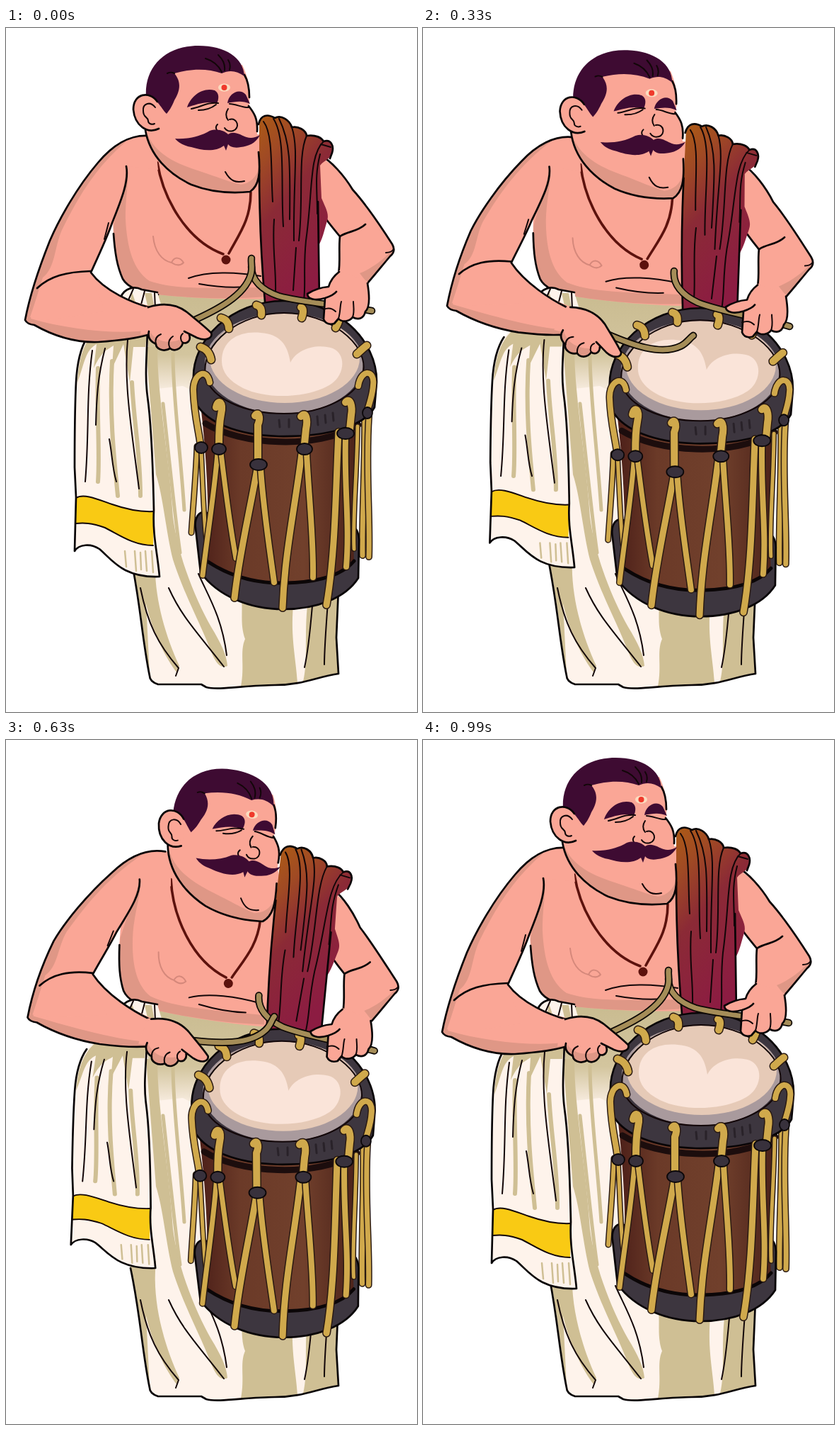
Recreate the animation shown at these times as an HTML page. Size 581 by 965 pixels, loop 1.02 s.

```html
<!DOCTYPE html>
<html lang="en">
<head>
<meta charset="utf-8">
<title>Drummer</title>
<style>
html, body { margin: 0; width: 100%; height: 100%; overflow: hidden; background: #fff; }
svg { display: block; width: 100%; height: 100%; }
path { fill: none; stroke-linecap: round; stroke-linejoin: round; }
.skin { fill: #faa696; }
.tan { fill: #df9786; }
.cream { fill: #fef3eb; }
.sand { fill: #cfbf94; }
.dark { fill: #3d363f; }
.hair { fill: #3e0b32; }
.gold { fill: #f9ca14; }
.ink { stroke: #080406; stroke-width: 2.7; }
.thin { stroke: #120608; stroke-width: 2; }
.bead { stroke: #5c120d; stroke-width: 3.6; }
</style>
</head>
<body>
<svg id="stage" viewBox="0 0 581 965" preserveAspectRatio="none"></svg>
<script>
const path = (cls, d, extra = '') => `<path class="${cls}" d="${d}" ${extra}/>`;
const stroke = (d, color, w) => `<path d="${d}" stroke="${color}" stroke-width="${w}"/>`;
const folds = (w, ...list) => list.map(d => stroke(d, '#cfbf94', w)).join('');
const cord = (d, w = 8) => stroke(d, '#2a1a12', w + 3) + stroke(d, '#d0a94c', w);
const stick = d => stroke(d, '#0d0805', 10.5) + stroke(d, '#a58d58', 7);
const knot = (x, y, r = 10) => `<ellipse cx="${x}" cy="${y}" rx="${r}" ry="8" fill="#38313c" stroke="#0b0709" stroke-width="1.8"/>`;
const oval = (x, y, rx, ry, c) => `<ellipse cx="${x}" cy="${y}" rx="${rx}" ry="${ry}" fill="${c}"/>`;

const defs = `<defs>
  <linearGradient id="silk" x1="0" y1="0" x2=".45" y2="1">
    <stop offset="0" stop-color="#ac5a16"/><stop offset=".22" stop-color="#a04a24"/>
    <stop offset=".5" stop-color="#8b2a36"/><stop offset="1" stop-color="#8c1c42"/>
  </linearGradient>
  <linearGradient id="wood">
    <stop offset="0" stop-color="#4d2019"/><stop offset=".25" stop-color="#6b3a28"/>
    <stop offset=".65" stop-color="#71402c"/><stop offset="1" stop-color="#4a2119"/>
  </linearGradient>
  <linearGradient id="waist" x1="0" y1="0" x2="0" y2="1">
    <stop offset="0" stop-color="#c9bb90"/><stop offset=".6" stop-color="#d3c59e"/>
    <stop offset="1" stop-color="#fef3eb"/>
  </linearGradient>
</defs>`;

const skirt =
  path('cream', 'M168 374 C180 364 200 368 215 372 L366 378 L440 560 L471 790 L467 860 L470 911 C440 915 420 927 380 927 C340 927 300 935 283 930 L276 926 L215 926 Q203 922 203 914 C192 860 192 810 176 745 L120 445 Z') +
  path('', 'M196 372 L366 378 L372 440 L280 520 L250 505 L205 510 Z', 'style="fill:url(#waist)"') +
  path('sand', 'M198 450 L214 450 C214 520 230 600 236 690 C244 750 270 810 290 845 C304 868 312 885 313 900 C302 905 296 894 290 880 C276 842 252 800 236 750 C226 710 222 660 212 630 Z') +
  path('sand', 'M172 720 L212 735 C206 790 222 850 245 900 L242 910 C226 890 206 850 198 812 L203 912 C194 860 190 800 176 745 Z') +
  path('sand', 'M332 800 L406 815 C402 860 410 890 412 924 C390 928 350 930 332 929 C338 900 330 880 338 862 C330 840 336 820 332 800 Z') +
  path('sand', 'M428 800 L470 800 L467 860 L470 911 L420 922 C428 890 420 850 428 800 Z') +
  folds(5, 'M236 460 C236 520 246 590 252 680', 'M222 530 C234 640 240 700 246 740') +
  path('ink', 'M176 745 C190 810 192 860 203 914 Q203 922 215 926 L276 926 L283 930 C300 935 340 927 380 927 C420 927 440 915 470 911 L467 860 L470 790') +
  path('thin', 'M190 790 C200 840 215 870 244 903 L240 914 M230 790 C248 830 268 850 308 901 M272 770 C285 800 305 830 312 885 M433 815 C430 850 427 880 422 902 M455 810 C452 850 450 880 450 898');

const drape =
  path('cream', 'M135 418 C112 432 102 460 99 500 C97 540 97 580 97 620 L99 662 L97 738 C103 728 120 727 132 735 C150 750 165 776 217 774 C214 740 207 715 209 680 C208 640 207 570 200 520 C196 490 199 465 200 425 Z') +
  path('sand', 'M135 420 C112 436 103 462 101 500 C112 470 112 455 128 446 L124 480 C136 455 142 455 152 448 L150 480 L166 446 L175 500 L180 450 L197 450 L200 425 Z') +
  folds(6, 'M130 480 C128 540 133 600 130 640', 'M150 470 C146 540 152 600 158 660', 'M178 500 C181 560 190 600 190 660') +
  folds(2.5, 'M168 738 L170 760', 'M182 738 L184 766', 'M197 738 L199 766', 'M190 740 L191 764', 'M206 738 L208 768') +
  path('gold', 'M99 663 C110 656 130 665 150 672 C170 679 190 683 209 682 L208 730 C180 730 160 715 140 705 C120 698 110 698 99 699 Z') +
  path('ink', 'M115 436 C103 455 100 480 99 500 C97 540 97 580 97 620 L99 662 L97 738 C103 728 120 727 132 735 C150 750 165 776 217 774 C214 740 207 715 209 680 C208 640 207 570 200 520 C196 490 199 465 200 425') +
  path('thin', 'M99 663 C110 656 130 665 150 672 C170 679 190 683 209 682 M99 699 C110 698 120 698 140 705 C160 715 180 730 208 730') +
  path('thin', 'M122 455 C113 520 118 570 112 640 M140 452 C130 490 128 520 127 560 M172 440 C166 500 178 570 188 650 M146 580 C150 600 150 620 156 640');

const torso =
  path('skin', 'M185 158 L360 150 L372 190 L372 382 C310 384 250 380 215 376 C195 374 176 372 166 354 C158 335 155 310 152 292 L150 250 L165 190 Z') +
  path('tan', 'M170 196 C176 205 168 240 169 270 C171 310 180 342 203 357 C240 370 300 367 366 366 L368 379 C310 384 250 380 215 376 C195 374 176 372 166 354 C156 330 152 300 152 280 Z') +
  path('ink', 'M152 290 C154 318 157 336 165 354 C172 366 190 373 215 376') +
  path('thin', 'M258 353 C285 343 325 344 360 350 M273 361 C295 365 318 367 340 365') +
  stroke('M208 294 C210 315 220 328 234 331 C238 322 246 323 251 331 C246 336 240 335 234 331', '#d5887b', 2) +
  path('bead', 'M214 190 C222 240 255 300 307 319 M346 232 C346 270 330 290 315 318') +
  `<circle cx="311" cy="327" r="6.5" fill="#5c120d"/>`;

const pleats =
  path('cream', 'M162 382 C166 366 182 364 190 369 L214 373 L222 400 L170 400 Z') +
  path('sand', 'M178 372 L186 396 L174 396 Z M196 374 L206 374 L210 396 L201 396 Z') +
  path('ink', 'M162 380 C168 366 182 364 192 369 L214 373') +
  path('thin', 'M180 368 L172 386 M196 371 L190 394 M210 373 L211 396');

const scarf =
  path('', 'M358 142 C357 126 368 120 380 127 C389 122 401 130 404 140 C413 138 424 144 425 152 C438 150 446 155 449 160 C459 156 464 166 461 176 C458 186 450 186 444 194 L446 240 C452 254 457 262 454 272 C450 285 447 300 441 308 L443 388 L366 388 C362 340 359 280 358 210 Z', 'style="fill:url(#silk)"') +
  path('ink', 'M357 136 C360 122 370 121 380 127 C389 122 401 130 404 140 C413 138 424 144 425 152 C438 150 446 155 449 160 C459 156 464 166 461 176 L458 184 M441 245 L443 386 M358 200 C358 280 362 340 366 386') +
  path('thin', 'M364 132 C378 150 374 200 377 245 M378 128 C396 155 388 220 392 280 M386 128 C402 160 402 190 401 270 M404 140 C414 170 406 210 407 300 M425 152 C412 180 421 240 414 300 M449 160 C428 180 434 230 424 300 M444 178 C436 210 440 225 440 262 M379 270 C376 310 382 340 381 372 M424 300 C420 340 424 360 421 384 M445 164 L459 168 M410 310 L406 370');

const head =
  path('skin', 'M240 50 L334 52 C345 75 346 95 343 112 C352 122 356 130 355 150 L357 175 C360 205 358 222 345 231 C315 234 285 230 262 221 C230 206 203 180 197 146 L197 95 Z') +
  path('tan', 'M197 142 C205 170 228 186 262 198 C290 207 318 218 332 221 C346 219 353 210 357 200 C359 216 355 226 345 231 C315 234 285 230 262 221 C228 206 203 180 197 142 Z') +
  path('ink', 'M197 144 C203 180 230 206 262 221 C285 230 315 234 345 231 C358 222 360 205 357 175 M343 110 C351 120 356 128 355 146 M337 66 C343 76 344 86 344 98') +
  path('hair', 'M198 98 C195 55 225 25 272 25 C310 25 336 42 337 68 C326 60 316 59 305 64 C285 57 262 57 238 64 C250 78 244 92 238 102 C234 112 231 116 227 121 C218 112 214 98 198 96 Z') +
  path('thin', 'M305 62 C300 52 292 46 282 43 M309 60 C310 50 306 44 300 38 M316 59 C318 52 316 48 314 45 M238 64 C234 62 232 62 228 64') +
  path('skin', 'M217 110 C205 88 180 90 180 115 C182 138 200 150 217 142 Z') +
  path('ink', 'M214 104 C203 88 180 92 180 115 C182 138 200 150 216 142') +
  path('thin', 'M211 112 C204 103 193 106 194 117 C194 127 200 124 201 131 C201 135 206 137 210 135') +
  path('hair', 'M256 112 C261 96 278 83 295 88 C302 92 301 100 298 107 C284 102 270 108 256 112 Z M313 106 C315 92 330 84 339 94 L345 107 C334 102 324 104 313 106 Z') +
  path('thin', 'M262 114 C275 112 285 104 300 106 M272 116 C284 116 292 112 297 108 M316 107 C326 107 334 113 344 112 M314 114 C310 120 311 126 314 130 M316 129 C328 126 331 142 321 145 C314 147 311 144 309 141 M299 136 C295 140 297 146 303 146') +
  path('hair', 'M239 156 C255 157 273 154 288 145 C300 141 310 146 314 150 C322 144 332 151 340 154 C346 156 352 155 359 151 C353 163 342 167 332 168 C322 170 316 167 314 164 L311 173 L308 166 C295 176 275 172 262 168 C252 166 245 163 239 156 Z') +
  path('thin', 'M310 203 C317 216 325 219 337 216') +
  oval(308.5, 84, 8.5, 5.5, '#fbdcc0') + `<circle cx="308.5" cy="84" r="4" fill="#f0392b"/>`;

const drum =
  cord('M270 590 C268 640 264 680 262 712', 6) +
  cord('M507 545 C508 620 503 690 504 744', 7) + cord('M513 548 C508 620 515 690 513 746', 7) +
  path('dark ink', 'M284 684 C272 680 266 692 268 706 L275 768 C300 802 345 820 392 820 C440 820 480 804 498 776 L499 722 Q498 705 488 702 Z') +
  path('', 'M276 540 C284 610 288 690 284 752 C320 776 360 784 395 783 C440 782 475 772 492 752 C490 700 494 620 500 552 Z', 'style="fill:url(#wood)"') +
  path('', 'M284 752 C320 776 360 784 395 783 C440 782 475 772 492 752', 'stroke="#0b0607" stroke-width="5"') +
  path('', 'M282 558 C330 588 440 596 498 560', 'stroke="#1c0d0d" stroke-width="9"') +
  path('dark ink', 'M265 497 C262 440 318 385 393 385 C468 385 525 440 524 500 L521 535 C505 564 450 577 385 576 C325 574 285 556 270 532 Z') +
  stroke('M441 560 L440 548 M452 557 L451 546 M463 554 L462 543 M387 563 L386 553 M400 563 L400 552', '#292229', 3) +
  oval(393, 473, 112, 71, '#a99a9d') + oval(394, 466, 106, 63, '#e6cab7') +
  path('', 'M305 470 C305 440 330 427 360 430 C386 432 398 445 402 472 C412 452 440 445 462 452 C482 461 478 490 460 502 C430 522 370 525 335 508 C315 498 305 485 305 470 Z', 'style="fill:#fae4d9"') +
  path('thin', 'M282 490 C275 445 330 402 393 402 C456 402 512 445 505 485 C500 518 450 544 393 544 C336 544 288 522 282 490') +
  [[275, 450, 290, 468], [304, 409, 315, 424], [354, 391, 361, 405], [417, 394, 418, 409], [470, 409, 466, 423], [510, 448, 496, 460]]
    .map(([a, b, c, d]) => cord(`M${a} ${b} Q${(a + c) / 2 + 5} ${(b + d) / 2 - 5} ${c} ${d}`, 10)).join('') +
  cord('M288 500 C284 478 264 488 265 512 C266 545 272 565 275 588', 8) +
  cord('M498 505 C502 480 522 482 519 504 C518 520 513 530 511 540', 8) +
  cord('M276 598 C278 640 280 700 283 720', 5) +
  cord('M299 600 C294 660 284 720 278 772', 7) + cord('M304 600 C310 650 318 710 325 748', 7) +
  cord('M355 622 C345 680 330 740 323 804', 9) + cord('M360 622 C364 680 372 730 379 782', 8) +
  cord('M418 600 C408 680 394 740 391 818', 9) + cord('M425 600 C428 660 435 720 434 775', 8) +
  cord('M470 570 C466 650 466 740 453 814', 9) + cord('M480 578 C478 650 486 700 481 760', 8) +
  cord('M497 562 C496 630 490 690 492 735', 5) +
  cord('M297 535 C300 522 308 528 304 545 C301 560 301 575 301 588', 10) +
  cord('M352 547 C356 540 361 548 356 560 L356 608', 10) +
  cord('M417 548 C424 540 427 552 424 566 L422 586', 10) +
  cord('M480 528 C487 520 490 535 488 546 L486 566', 10) +
  knot(276, 592, 9) + knot(301, 594) + knot(357, 616, 12) + knot(422, 594, 11) + knot(480, 572, 12) + knot(511, 543, 7);

const leftHand =
  `<g id="stickL">${stick('M262 414 C298 398 337 378 346 348 C349 338 346 332 347 325')}</g>` +
  path('skin', 'M196 394 C220 388 240 389 256 401 C268 411 281 421 290 430 C293 438 282 442 270 437 L259 433 C262 441 256 446 250 444 C248 453 238 457 232 452 C222 458 212 452 212 446 C203 442 200 436 201 431 L190 432 Z') +
  path('tan', 'M203 428 C212 442 228 446 245 440 L250 444 C248 453 238 457 232 452 C222 458 212 452 212 446 C203 442 200 436 203 428 Z') +
  path('ink', 'M201 394 C220 388 240 389 256 401 C268 411 281 421 290 430 C293 438 282 442 270 437 L252 428 M259 433 C262 441 256 446 250 444 C248 453 238 457 232 452 C222 458 212 452 212 446 C203 442 200 436 202 428') +
  path('thin', 'M212 446 C210 438 214 434 219 432 M232 452 C228 444 231 438 236 435 M250 444 C246 440 246 434 250 431');

const rightHand =
  `<g id="stickR">${stick('M347 337 C347 356 362 370 385 378 C420 388 470 390 517 399')}</g>` +
  path('skin', 'M471 342 C463 350 458 358 456 365 C444 366 434 370 426 375 C426 383 438 385 451 381 L449 411 Q453 420 464 417 L470 410 C475 416 486 414 490 408 C499 413 506 409 508 400 C515 394 514 378 511 357 Z') +
  path('ink', 'M471 344 C463 350 458 358 456 365 C444 366 434 370 426 375 C426 383 438 385 451 381 C460 378 464 376 467 372 M451 381 L449 411 Q453 420 464 417 L470 410 C475 416 486 414 490 408 C499 413 506 409 508 400 C515 394 514 378 511 360') +
  path('thin', 'M470 410 C473 400 472 392 474 386 M490 408 C493 400 491 392 491 386 M449 397 C456 394 462 396 466 400');

// Limb outlines in the rest pose, bent each frame by a weight along the limb.
const armL = [
  ['skin', 'M210 152 C175 150 150 166 130 190 C100 225 75 270 62 300 C50 330 35 370 27 412 Q30 418 40 419 C70 436 100 444 130 443 C160 441 185 438 208 432 L208 393 C180 388 140 372 120 345 C132 318 142 298 150 275 C160 245 168 230 170 195 L215 200 Z'],
  ['tan', 'M170 160 C150 168 138 180 130 190 C100 225 75 270 62 300 C50 330 35 370 27 412 Q30 418 40 419 C70 436 100 444 130 443 C160 441 185 438 206 432 L205 426 C160 433 90 426 35 410 C42 385 46 370 52 352 C70 338 68 310 79 285 C102 238 128 195 170 160 Z'],
  ['skin', 'M50 360 C62 350 90 345 118 345 L140 400 L60 412 L34 408 Z'],
  ['ink', 'M202 152 C175 150 150 166 130 190 C100 225 75 270 62 300 C50 330 35 370 27 412 Q30 418 40 419 C70 436 100 444 130 443 C160 441 185 438 204 432'],
  ['ink', 'M170 195 C174 215 164 240 150 275 C142 298 132 318 120 345 C140 372 180 388 202 394'],
  ['ink', 'M44 367 C62 350 85 344 120 343'],
  ['thin', 'M145 275 L139 298']
];
const armR = [
  ['skin', 'M436 178 C460 188 478 208 490 228 C510 250 530 280 546 305 C550 312 548 318 543 322 C532 335 520 350 511 360 L470 352 C472 330 471 312 472 294 C462 280 455 274 448 262 L436 250 Z'],
  ['tan', 'M548 312 C530 330 515 340 500 346 L511 360 C520 350 532 335 543 322 Z'],
  ['ink', 'M444 179 C460 188 478 208 490 228 C510 250 530 280 546 305 C550 312 548 318 543 322 C532 335 520 350 511 360'],
  ['ink', 'M447 262 C455 274 462 282 472 294 C470 312 473 330 470 346'],
  ['ink', 'M472 294 C484 286 496 288 508 277'],
  ['thin', 'M537 317 C542 317 546 315 548 312']
];
const group = (id, body) => `<g id="${id}">${body}</g>`;
const limb = (id, parts) => group(id, parts.map(([cls]) => path(cls, '')).join(''));

const stage = document.getElementById('stage');
stage.innerHTML = defs + skirt + group('drape', drape) + group('torso', torso) + pleats +
  limb('armR', armR) + group('scarf', scarf) + group('drum', drum) +
  limb('armL', armL) + group('handR', rightHand) + group('handL', leftHand) + group('head', head);
const el = id => document.getElementById(id);
const move = (id, t) => el(id).setAttribute('transform', t);

// Each track lists its values at these times.
const times = [0, 240, 420, 540, 570, 690, 750, 870, 990];
const tracks = {
  lean:   [0, .25, .57, .82, .82, 1, 1, .4, 0],
  headX:  [0, 8, 19, 28, 28, 44, 49, 20, 0],
  headY:  [0, 2, 3, 3, 3, 2, 1, 1, 0],
  nod:    [0, 1.2, 3.5, 5, 5, 11.5, 14, 5, 0],
  elbowX: [0, 4, 10, 1, 1, 6, 8, 2, 0],
  elbowY: [0, -12, -28, -15, -15, -26, -30, -12, 0],
  wrist:  [0, 10, 29, 0, 0, 22, 29, 9, 0],
  beat:   [0, 20, 36, 13, 13, 26, 30, 3, 0],
  tapY:   [0, 13, 24, 31, 31, 41, 44, 20, 0],
  tap:    [0, 4, 7, 8, 8, 3, 1, 5, 0]
};
function sample(t) {
  let i = 0;
  while (i < times.length - 2 && t >= times[i + 1]) i++;
  const k = Math.min(1, (t - times[i]) / (times[i + 1] - times[i]));
  const pose = {};
  for (const n in tracks) pose[n] = tracks[n][i] + (tracks[n][i + 1] - tracks[n][i]) * k;
  return pose;
}

const clamp = v => Math.max(0, Math.min(1, v));
const pivot = [165, 365];
function leanPoint(x, y, deg) {
  const a = deg * Math.PI / 180, c = Math.cos(a), s = Math.sin(a);
  const u = x - pivot[0], v = y - pivot[1];
  return [pivot[0] + u * c - v * s, pivot[1] + u * s + v * c];
}
function bend(id, parts, warp) {
  const nodes = el(id).children;
  parts.forEach(([, d], i) => nodes[i].setAttribute('d', d.replace(/([\d.]+) ([\d.]+)/g,
    (m, x, y) => warp(+x, +y).map(v => v.toFixed(1)).join(' '))));
}

function draw(t) {
  const p = sample(t), deg = 7 * p.lean;
  move('torso', `rotate(${deg} ${pivot})`);
  move('scarf', `translate(${3 * p.lean} ${385 + 29 * p.lean}) skewX(${-deg}) translate(0 -385)`);
  move('head', `translate(${p.headX} ${p.headY}) rotate(${p.nod} 180 115)`);
  move('drum', `translate(${-7 * p.lean} ${25 * p.lean}) skewX(${.5 * p.lean})`);
  move('drape', `translate(${6 * p.lean} ${41 * p.lean}) skewX(${-p.lean}) scale(1 ${1 - .094 * p.lean})`);
  move('handL', `rotate(${p.wrist} 205 415)`);
  move('stickL', `rotate(${p.beat} 265 412)`);
  move('handR', `translate(${5 * p.lean} ${p.tapY})`);
  move('stickR', `rotate(${p.tap} 480 392)`);
  bend('armL', armL, (x, y) => {
    const s = clamp((365 - y) / 150), [a, b] = leanPoint(x, y, deg);
    const f = (1 - s) * clamp((205 - x) / 110);
    return [x + s * (a - x) + f * p.elbowX, y + s * (b - y) + f * p.elbowY];
  });
  bend('armR', armR, (x, y) => {
    const s = clamp((300 - y) / 120), [a, b] = leanPoint(x, y, deg);
    return [x + s * (a - x) + (1 - s) * 7 * p.lean, y + s * (b - y) + (1 - s) * p.tapY];
  });
}

function tick() {
  draw(Math.floor(performance.now() % 1020 / 30) * 30);
  requestAnimationFrame(tick);
}
tick();
</script>
</body>
</html>
```
